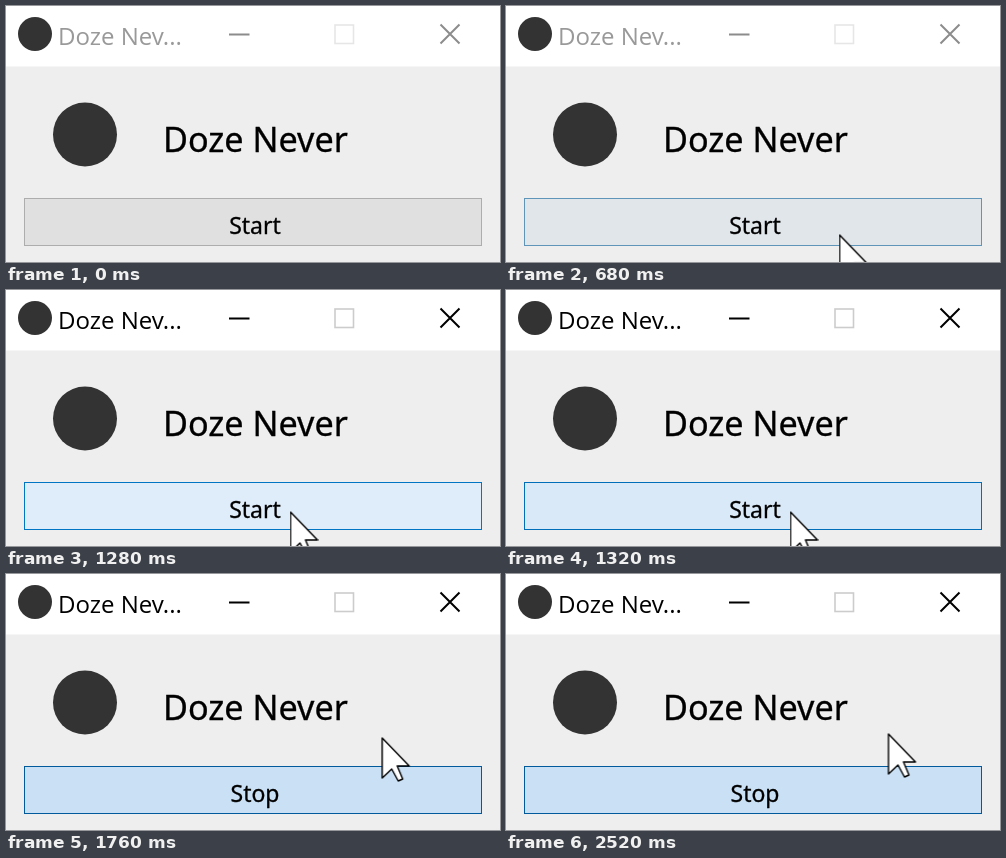
Write an HTML page that moves like this. It is 494 by 256 pixels and loops after 2.6 s.

```html
<!DOCTYPE html>
<html lang="en">
<head>
<meta charset="utf-8">
<title>Doze Never</title>
<style>
  html, body { margin: 0; width: 100%; height: 100%; overflow: hidden; background: #eee; }
  svg { display: block; width: 494px; height: 256px; }
  text { font-family: "Noto Sans", "Open Sans", sans-serif; }

  .caption, .controls, .max, .button, .start, .stop, .pointer {
    animation: 2600ms linear infinite;
  }
  .caption  { font: 24px "Open Sans", "Noto Sans", sans-serif; animation-name: caption; animation-timing-function: step-end; }
  .controls { fill: none; stroke-width: 2; animation-name: controls; animation-timing-function: step-end; }
  .max      { fill: none; stroke-width: 1.6; animation-name: max; animation-timing-function: step-end; }
  .heading  { font-size: 34.2px; stroke: #000; stroke-width: .3; }
  .label    { font-size: 23px; text-anchor: middle; stroke: #000; stroke-width: .3; }
  .button   { stroke-width: 1; animation-name: button; }
  .start    { animation-name: start; animation-timing-function: step-end; }
  .stop     { animation-name: stop; animation-timing-function: step-end; }
  .pointer  { fill: #fff; stroke: #000; stroke-width: 1.4; stroke-linejoin: round; animation-name: pointer; }

  /* window gains focus at 1200 ms */
  @keyframes caption  { 0% { fill: #999; }      46.154%, 100% { fill: #000; } }
  @keyframes controls { 0% { stroke: #8c8c8c; } 46.154%, 100% { stroke: #000; } }
  @keyframes max      { 0% { stroke: #e6e6e6; } 46.154%, 100% { stroke: #ccc; } }

  /* hover fade 580-800 ms, press fade 1260-1440 ms */
  @keyframes button {
    0%, 22.308%   { fill: #e0e0e0; stroke: #adadad; }
    30.769%, 48.462% { fill: #e2edf9; stroke: #0078c8; }
    55.385%, 100% { fill: #cae1f5; stroke: #005a9c; }
  }

  /* label toggles at 1400 ms */
  @keyframes start { 0% { opacity: 1; } 53.846%, 100% { opacity: 0; } }
  @keyframes stop  { 0% { opacity: 0; } 53.846%, 100% { opacity: 1; } }

  @keyframes pointer {
    0%, 15.385%   { transform: translate(471px, 261px); }
    16.923%       { transform: translate(451px, 250px); }
    26.154%       { transform: translate(334px, 229px); animation-timing-function: cubic-bezier(.333, .667, .667, 1); }
    33.846%       { transform: translate(284.500px, 222px); }
    52.308%       { transform: translate(284.500px, 222px); animation-timing-function: cubic-bezier(.37, 0, .63, 1); }
    70.769%, 100% { transform: translate(382.500px, 160px); }
  }
</style>
</head>
<body>
<svg viewBox="0 0 494 256" xmlns="http://www.w3.org/2000/svg">
  <rect width="494" height="256" fill="#eee"/>
  <rect width="494" height="60.5" fill="#fff"/>

  <circle cx="29" cy="28" r="17" fill="#333"/>
  <text class="caption" x="52" y="39">Doze Nev...</text>
  <path class="controls" d="M223 28.500H243.500M434.500 18.500L453.500 37.500M453.500 18.500L434.500 37.500"/>
  <rect class="max" x="329" y="19" width="18.5" height="18.5"/>

  <circle cx="79" cy="128.5" r="32" fill="#333"/>
  <text class="heading" x="157" y="146">Doze Never</text>

  <rect class="button" x="18.5" y="192.5" width="457" height="47"/>
  <text class="label start" x="249" y="228">Start</text>
  <text class="label stop" x="249" y="228">Stop</text>

  <path class="pointer" d="M0 0V40L9.500 31L16 43L20.500 41L15 28H27Z"/>
</svg>
</body>
</html>
```
